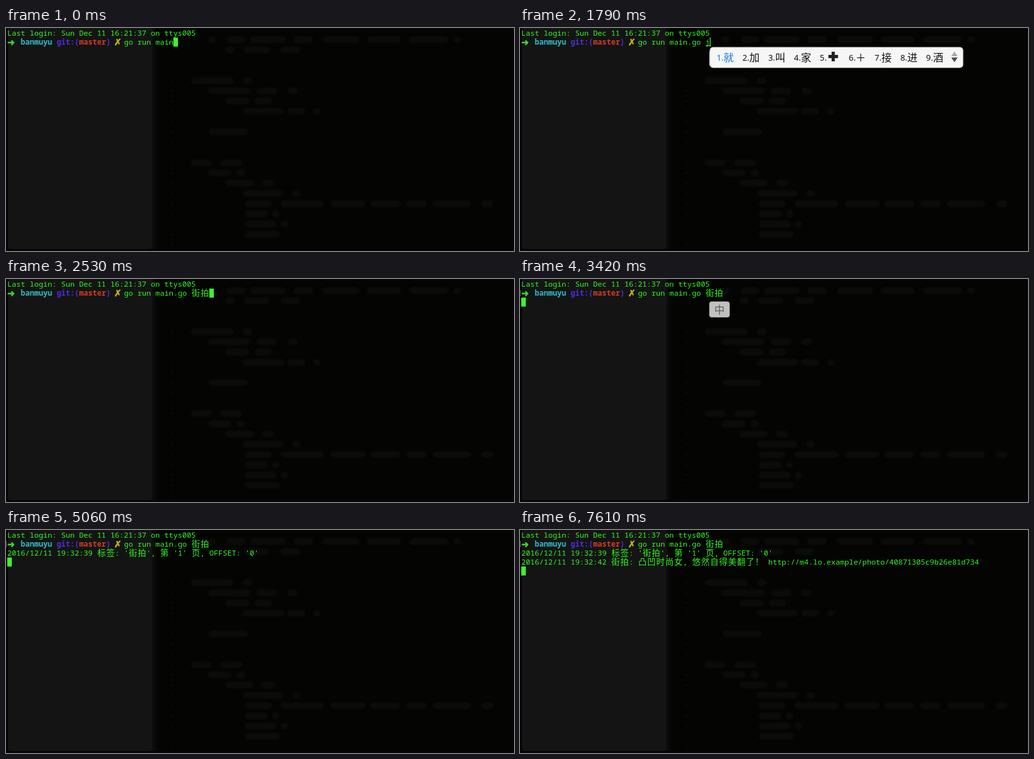
Recreate the animation shown at these times as an HTML page. Size 792 by 348 pixels, loop 8 s.

```html
<!DOCTYPE html>
<html lang="zh-CN">
<head>
<meta charset="utf-8">
<title>Terminal</title>
<style>
  html, body { margin: 0; width: 792px; height: 348px; overflow: hidden; background: #040403; }
  svg { display: block; }
  text { white-space: pre; }
  .mono { font: 11.667px "Noto Sans Mono", "DejaVu Sans Mono", monospace; }
  .bold { font-weight: 700; }
  .han { font: 13px "Noto Sans CJK SC", "Noto Sans CJK", sans-serif; }
  .sign { font: bold 14px "DejaVu Sans", sans-serif; stroke-width: 0.7; }
  .num { font: 13px "Noto Sans", "Open Sans", sans-serif; }
  .pick { font: 16px "Noto Sans CJK SC", "Noto Sans CJK", sans-serif; }
</style>
</head>
<body>
<svg id="stage" width="792" height="348" viewBox="0 0 792 348">
  <defs>
    <filter id="soft" x="-5%" y="-5%" width="110%" height="110%" color-interpolation-filters="sRGB">
      <feGaussianBlur stdDeviation="1.2"/>
    </filter>
    <linearGradient id="edge"><stop stop-color="#0d0d0d"/><stop offset="1" stop-color="#040403"/></linearGradient>
  </defs>
  <rect width="792" height="348" fill="#040403"/>
  <rect x="228" width="9" height="345" fill="url(#edge)"/>
  <rect x="3" y="-4" width="225" height="349" rx="4" fill="#141414"/>
  <g id="haze" filter="url(#soft)" fill="#0b0b0a"></g>
</svg>
<script>
const LOOP = 8000, CELL = 7, ROW = 14, TICK = 149.6, GREEN = '#2dfb1a';
const COMPOSE = 1790, COMMIT = 2530, ENTER = 3120, FIRST = 5060, SECOND = 7610;
const stage = document.getElementById('stage');
const timed = [];

function add(parent, tag, attrs, content) {
  const el = document.createElementNS('http://www.w3.org/2000/svg', tag);
  for (const key in attrs) el.setAttribute(key, attrs[key]);
  if (content) el.textContent = content;
  parent.appendChild(el);
  return el;
}

// A group seen from one time to another, with an optional opacity rule.
function group(from, to = LOOP, alpha = () => 1) {
  const el = add(stage, 'g', {});
  timed.push({ el, from, to, alpha });
  return el;
}

const colX = col => 2 + col * CELL;

// Writes on the cell grid and returns the next column; wide characters take two cells.
function write(parent, row, col, text, fill = GREEN, style = '') {
  const y = 12 + row * ROW;
  for (const run of text.match(/[\u3000-\uffff]|[^\u3000-\uffff]+/g)) {
    const wide = run > '\u2fff';
    add(parent, 'text', { x: colX(col) + (wide ? 0.5 : 0), y, fill, class: wide ? 'han' : 'mono ' + style }, run);
    col += wide ? 2 : run.length;
  }
  return col;
}

function sign(x, glyph, color) {
  add(stage, 'text', { x, y: 27, class: 'sign', fill: color, stroke: color }, glyph);
}

function blink(t) {
  const ticks = Math.floor((t - ENTER - 3 * TICK + 10) / TICK);
  return ticks < 0 || t >= SECOND ? 1 : Math.floor(ticks * 3 / 10) % 2;
}

function cursor(row, col, from, to) {
  add(group(from, to, blink), 'rect', { x: colX(col), y: 1 + row * ROW, width: CELL, height: ROW, fill: '#38fe27' });
}

// Faint code of another window: blocks of lines, indented step by step.
function drawHaze() {
  const haze = document.getElementById('haze');
  let seed = 7;
  const random = () => (seed = seed * 16807 % 2147483647) / 2147483647;
  const blob = (x, y, width, height) =>
    add(haze, 'rect', { x, y: y - height / 2, width, height, rx: height / 2 });

  function block(first, count, left) {
    for (let i = 0; i < count; i++) {
      const row = first + i, y = 18 + row * 16;
      let x = left + Math.min(i * 27, 84);
      const end = x + (row % 16 ? 40 + 110 * random() : 390);
      while (x < end) {
        const width = Math.min(12 + 60 * random(), Math.max(12, end - x));
        blob(x, y, width, 11);
        x += width + 4 + 14 * random();
      }
    }
  }
  block(0, 2, 315);
  block(4, 4, 288);
  block(9, 1, 316);
  block(12, 8, 288);
  for (let y = 82; y < 345; y += 16) blob(257, y, 4, 4);
}
drawHaze();

// Prompt
write(stage, 0, 0, 'Last login: Sun Dec 11 16:21:37 on ttys005');
sign(2, '➜', '#39d52d');
write(stage, 1, 3, 'banmuyu', '#34bbc8', 'bold');
write(stage, 1, 11, 'git:(', '#4d2fe0', 'bold');
write(stage, 1, 16, 'master', '#d33b22', 'bold');
write(stage, 1, 22, ')', '#4d2fe0', 'bold');
sign(168.5, '✗', '#c2b420');
add(group(2970), 'rect', { x: 0, y: 17, width: 1, height: 10, fill: '#5a5a5a' });

// Command, typed piece by piece
let col = 26;
function type(text, from, to) {
  col = write(group(from), 1, col, text);
  cursor(1, col, from, to);
}
type('go run main', 0, 300);
type('.', 300, 600);
type('go ', 600, 1650);
const inputCol = col;
type('街拍', COMMIT, ENTER);

// Output
write(group(FIRST), 2, 0, "2016/12/11 19:32:39 标签: '街拍', 第 '1' 页, OFFSET: '0'");
write(group(SECOND), 3, 0, '2016/12/11 19:32:42 街拍: 凸凹时尚女, 悠然自得美翻了！ http://m4.lo.example/photo/40871305c9b26e81d734');
cursor(2, 0, ENTER, FIRST);
cursor(3, 0, FIRST, SECOND);
cursor(4, 0, SECOND, LOOP);

// Input mode badge, fading out over three ticks
function badge(from) {
  const g = group(from, from + 450, t => 0.78 - 0.26 * Math.floor((t - from) / 150));
  add(g, 'rect', { x: 295.5, y: 35.5, width: 31, height: 24, rx: 3, fill: '#f6f6f3', stroke: '#d5d5d2' });
  add(g, 'text', { x: 311, y: 53.5, class: 'pick', fill: '#747474', 'text-anchor': 'middle' }, '中');
}
badge(1650);
badge(3420);

// Pinyin being typed, with its candidate box
function compose(from, to, typed, words) {
  const g = group(from, to);
  const end = colX(write(g, 1, inputCol, typed));
  add(g, 'rect', { x: 290, y: 27, width: end - 290, height: 1, fill: GREEN });
  add(g, 'rect', { x: end, y: 15, width: 1, height: 14, fill: '#7dff70' });
  const box = add(g, 'rect', { x: 296, y: 30, height: 32, rx: 5, fill: '#f6f6f6', stroke: '#b4b4b4', 'stroke-width': 0.8 });

  let x = 306.5;
  words.split(' ').forEach((word, i) => {
    const fill = i ? '#111' : '#0f74ea';
    const heavy = word === '➕';
    add(g, 'text', { x, y: 51, class: 'num', fill }, i + 1 + '.');
    if (heavy) add(g, 'path', { d: `M${x + 13.5} 44.5h15m-7.5 -7.5v15`, stroke: '#222', 'stroke-width': 5 });
    else add(g, 'text', { x: x + 10.8, y: 51.8, class: 'pick', fill }, word);
    x += 24.2 + (heavy ? 21 : 16 * word.length);
  });
  box.setAttribute('width', x + 17.5 - 296);
  add(g, 'path', { d: `M${x - 1} 44l5 -7.5l5 7.5z`, fill: '#adadad' });
  add(g, 'path', { d: `M${x - 1} 46l5 7.5l5 -7.5z`, fill: '#505050' });
}
compose(COMPOSE, 2080, 'j', '就 加 叫 家 ➕ ＋ 接 进 酒');
compose(2080, 2230, 'jie', '接 姐姐 街 节 解 借 界 姐 结');
compose(2230, COMMIT, "jie'pai", '街拍 节拍 揭牌 界牌 接拍 借牌 接 借 截');

function draw() {
  const t = performance.now() % LOOP;
  for (const { el, from, to, alpha } of timed) {
    el.setAttribute('opacity', t >= from && t < to ? alpha(t) : 0);
  }
  requestAnimationFrame(draw);
}
draw();
</script>
</body>
</html>
```
